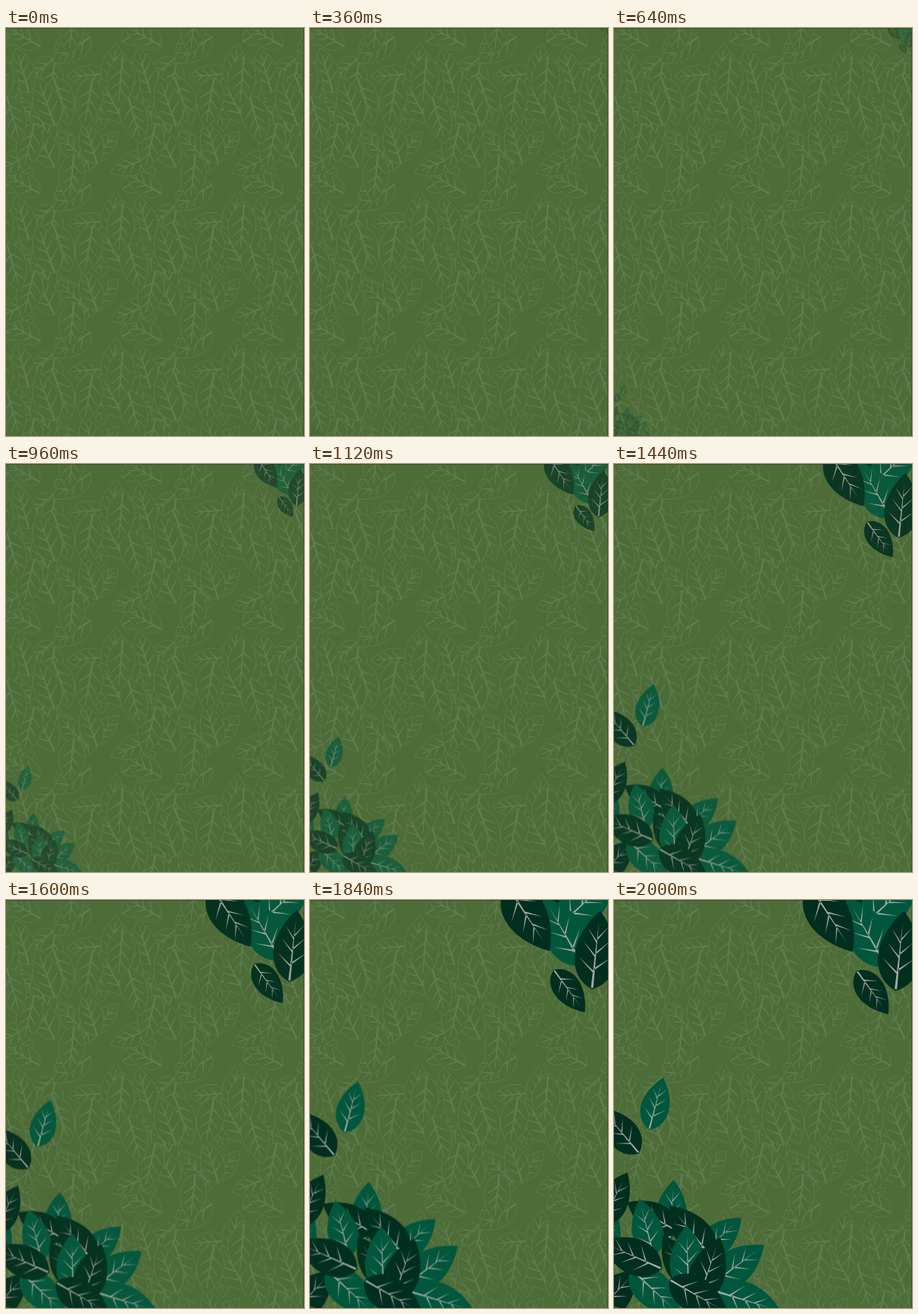
These frames come from a looping animation (393x538 px, 5 s). An HTML page:

```html
<!DOCTYPE html>
<html lang="en">
<head>
<meta charset="utf-8">
<title>Leaves</title>
<style>
  html, body { margin: 0; height: 100%; overflow: hidden; background: #4e6c37; }
  svg { display: block; }
  #pattern path { vector-effect: non-scaling-stroke; }
</style>
</head>
<body>
<svg width="393" height="538" viewBox="0 0 393 538">
  <rect width="393" height="538" fill="#4e6c37"/>
  <g id="pattern" stroke="#5f7d52" stroke-width=".8"></g>
  <path d="M0 .5H392.5V538" fill="none" stroke="#3a542f"/>
  <g id="bottom"></g>
  <g id="top"></g>
</svg>
<script>
const LOOP = 5000, STEP = 40, START = 320, END = 2000;
const TILE_W = 160, TILE_H = 194.5, PER_TILE = 38;
const GROUND = '#4e6c37', LINE = '#5f7d52', DARK = '#002e1f', MID = '#00573d', VEIN = '#a3a9a0';
const $ = id => document.getElementById(id);

// A leaf 100 long, centred on the origin, tip to the right; veins taper.
const BLADE = 'M-50 0C-36 -34 10 -36 50 0C10 36 -36 34 -50 0Z';
let ribs = 'M-48 -1.5L36 0L-48 1.5Z';
for (const x of [-28, -8, 10])
  for (const side of [-1, 1])
    ribs += `M${x + side * 2} 0l19 ${side * (15 - x / 5)}l-16 ${side * (x / 5 - 15)}z`;

const leaf = (x, y, angle, length, fill, vein) =>
  `<g transform="translate(${x} ${y}) rotate(${angle}) scale(${length / 100})">` +
  `<path d="${BLADE}" fill="${fill}"/><path d="${ribs}" fill="${vein}"/></g>`;

let seed = 11;
const random = () => (seed = seed * 16807 % 2147483647) / 2147483647;

// Repeating ground: later leaves lie on top, larger and more upright.
function drawPattern() {
  let out = '';
  for (let i = 0; i < PER_TILE; i++) {
    const rank = i / PER_TILE;
    const x = (i * .618 + random() * .1) % 1 * TILE_W;
    const y = random() * TILE_H;
    const angle = (random() < .5 ? 90 : -90) + (random() - .5) * (240 - 180 * rank);
    const length = 44 + 26 * rank;
    for (let tx = -1; tx < 3; tx++)
      for (let ty = -1; ty < 4; ty++)
        out += leaf(x + tx * TILE_W, y + ty * TILE_H, angle, length, GROUND, LINE);
  }
  $('pattern').innerHTML = out;
}

// Each leaf: colour, centre, heading; drawn back to front.
function layer(id, length, leaves) {
  $(id).innerHTML += leaves.map(([fill, x, y, angle]) => leaf(x, y, angle, length, fill, VEIN)).join('');
}

drawPattern();
layer('bottom', 71, [[MID, 55.5, 268.5, -75]]);
layer('bottom', 78, [
  [MID, -11, 440, -75], [MID, 76, 408, -86], [DARK, 51, 418, 210],
  [DARK, 8, 304, 230], [DARK, 0, 394, -63], [MID, 139, 445, -42],
  [MID, 43, 432, -104], [DARK, 85, 476, 238]
]);
layer('bottom', 90, [
  [MID, 162, 482, -37], [MID, 177, 529, 17], [DARK, 102, 438, -129],
  [DARK, 0, 520, -46], [MID, 55, 517, 43], [MID, 97, 474, -92],
  [DARK, 22, 468, 204], [DARK, 125, 487, -71], [DARK, 112, 523, 30]
]);
layer('top', 106, [
  [DARK, 298, -12, 22], [MID, 365, 0, -43], [MID, 333, 42, 240],
  [DARK, 286, 24, 57], [DARK, 377, 67, -84]
]);
layer('top', 71, [[DARK, 341, 122, 54]]);

// Grow and fade a cluster out of its corner.
function grow(id, cx, cy, s) {
  $(id).setAttribute('transform', `translate(${cx * (1 - s)} ${cy * (1 - s)}) scale(${s})`);
  $(id).setAttribute('opacity', s ** .75);
}

function frame() {
  const t = Math.floor(performance.now() % LOOP / STEP) * STEP;
  const p = Math.min(1, (t - 20) / (END - 20));
  const s = t < START ? 0 : (1 - Math.cos(Math.PI * p)) / 2;
  grow('bottom', 0, 538, s);
  grow('top', 393, 0, s);
  requestAnimationFrame(frame);
}
frame();
</script>
</body>
</html>
```
